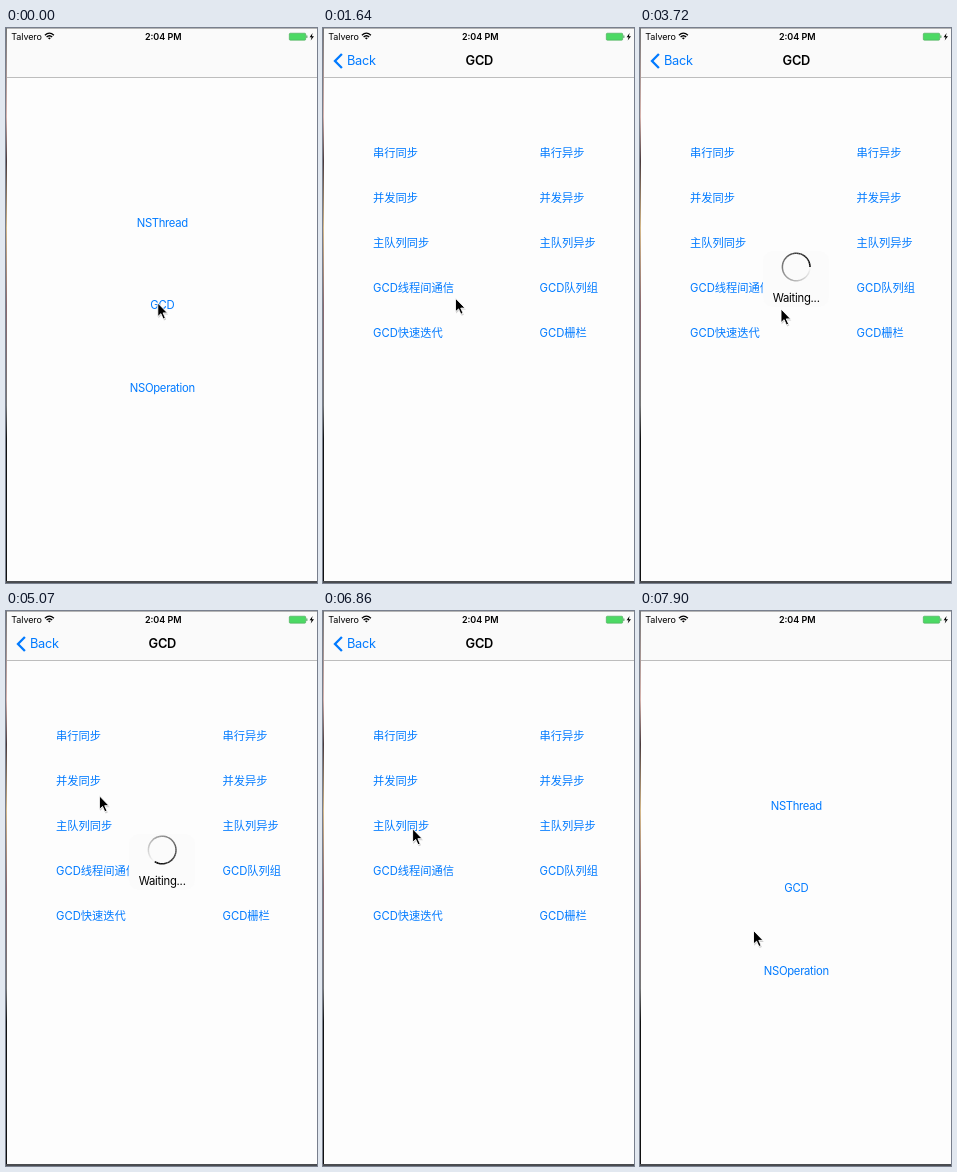
These frames come from a looping animation (311 px wide and 555 px high, 8000 ms). An HTML page:

```html
<!DOCTYPE html>
<html lang="zh">
<head>
<meta charset="utf-8">
<title>GCD demo</title>
<style>
  html, body { margin: 0; width: 100%; height: 100%; overflow: hidden; background: #fdfdfd; }
  svg { display: block; width: 100vw; height: 100vh; }
  text { font-family: Inter, "Noto Sans CJK SC", "Noto Sans CJK", sans-serif; }
  .btn text { font-size: 11.27px; fill: #007aff; }
  .latin text { letter-spacing: -.3px; text-anchor: middle; }
</style>
</head>
<body>
<svg viewBox="0 0 311 555" preserveAspectRatio="none">
  <defs>
    <linearGradient id="desk" x1="0" y1="0" x2="0" y2="1">
      <stop offset="0" stop-color="#777"/>
      <stop offset=".16" stop-color="#d8b4ae"/>
      <stop offset=".24" stop-color="#4a3a3c"/>
      <stop offset=".36" stop-color="#d6b98a"/>
      <stop offset=".5" stop-color="#8a6a70"/>
      <stop offset=".68" stop-color="#777"/>
      <stop offset=".74" stop-color="#111"/>
      <stop offset="1" stop-color="#111"/>
    </linearGradient>
    <linearGradient id="shade">
      <stop offset="0" stop-color="#000" stop-opacity="0"/>
      <stop offset="1" stop-color="#000" stop-opacity=".22"/>
    </linearGradient>
    <linearGradient id="table" x1="0" y1="0" x2="1" y2="1">
      <stop offset="0" stop-color="#7a6c6c"/>
      <stop offset="1" stop-color="#4c4145"/>
    </linearGradient>
    <linearGradient id="deck" x1="0" y1="0" x2="1" y2="1">
      <stop offset="0" stop-color="#d9d6d3"/>
      <stop offset="1" stop-color="#bfbbb8"/>
    </linearGradient>
    <clipPath id="screen"><rect x="1" y="0" width="310" height="553"/></clipPath>
    <clipPath id="photoBox"><rect x="100" y="418" width="112.5" height="112.5"/></clipPath>
  </defs>

  <rect width="311" height="555" fill="url(#desk)"/>
  <rect y="553" width="311" height="2" fill="#4a4c50"/>

  <g clip-path="url(#screen)">
    <rect x="1" width="310" height="553" fill="#fdfdfd"/>
    <g id="home" class="btn latin">
      <text x="156.3" y="198.6">NSThread</text>
      <text id="gcd" x="156.3" y="281.3">GCD</text>
      <text x="156.3" y="363.6">NSOperation</text>
    </g>
    <rect id="dim" x="1" width="310" height="553"/>

    <g id="page">
      <rect x="-4" y="49" width="5" height="504" fill="url(#shade)"/>
      <rect x="1" width="311" height="553" fill="#fdfdfd"/>
      <g id="list" class="btn"></g>
      <g id="photo" class="btn">
        <text x="133.3" y="407.3">隐藏图片</text>
        <g clip-path="url(#photoBox)">
          <rect x="100" y="418" width="113" height="113" fill="url(#table)"/>
          <path d="M100 418H213V481L160 517Q152 522 146 517L100 467Z" fill="url(#deck)"/>
          <path d="M100 468L146 518Q152 523 160 518L213 482" fill="none" stroke="#efecea" stroke-width="1.2"/>
          <path d="M100 418H213V430L114 459L100 446Z" fill="#3a3235"/>
          <g id="keys" stroke="#b9b2b0" stroke-width=".8"></g>
          <path d="M157 455L205 440L213 448V462L178 482Z" fill="#d6d2cf" stroke="#b3aeab" stroke-width=".6"/>
        </g>
      </g>
    </g>

    <rect x="1" width="310" height="49" fill="#fafafa"/>
    <rect id="tint" x="1" y="0" height="49" fill="#000" opacity=".035"/>
    <rect x="1" y="49" width="310" height="1" fill="#bdbdbd"/>
    <rect x="1" width="310" height=".7" fill="#999"/>

    <g id="nav">
      <path id="chevron" d="M18.9 26L12 33L18.9 40" fill="none" stroke="#007aff" stroke-width="2.3"/>
      <text id="back" y="37.4" font-size="12.8" letter-spacing="-.3" fill="#007aff">Back</text>
      <text id="title" y="37.4" font-size="12.8" font-weight="600" letter-spacing="-.3" text-anchor="middle">GCD</text>
    </g>

    <text x="5.3" y="11.6" font-size="9" letter-spacing="-.1">Talvero</text>
    <g fill="none" stroke="#000" stroke-width="1.3">
      <path d="M38.9 7.2Q43.4 3 47.9 7.2M40.6 9Q43.4 6.4 46.2 9"/>
      <path d="M43.4 11.6L41.9 10Q43.4 8.8 44.9 10Z" fill="#000" stroke="none"/>
    </g>
    <text x="157.3" y="11.7" font-size="9" font-weight="600" text-anchor="middle">2:04 PM</text>
    <rect x="283.3" y="5.2" width="16.4" height="7" rx="1" fill="#4cd964" stroke="#4aa65a" stroke-width=".6"/>
    <rect x="300.3" y="7.3" width="1.1" height="2.8" rx=".5" fill="#4aa65a"/>
    <path d="M306.6 5L303.6 9.2H305.6L304.7 12.6L308 8.2H305.9Z"/>

    <g id="hud">
      <rect x="123" y="223" width="66" height="56" rx="10" fill="#fbfbfb"/>
      <g id="ring" fill="none" stroke="#000" stroke-width="1.5"></g>
      <text x="156.2" y="274" font-size="11.27" letter-spacing="-.24" text-anchor="middle">Waiting...</text>
    </g>
  </g>

  <g id="cursor">
    <path d="M.6 1.6V15.2L3.8 12.2L6.2 17.6L8.4 16.6L6 11.4H10.4Z" fill="#000" opacity=".18"/>
    <path d="M0 0V13.6L3.1 10.7L5.4 16L7.6 15L5.3 9.9H9.6Z" stroke="#fff" stroke-width=".9"/>
  </g>
</svg>
<script>
const LOOP = 8000, STEP = 149, W = 311;
const PUSH = 748, POP = 7256;
const $ = id => document.getElementById(id);
const set = (id, attrs) => {
  for (const name in attrs) $(id).setAttribute(name, attrs[name]);
};
const show = (id, on) => set(id, { display: on ? "inline" : "none" });

const rows = [
  ["串行同步", "串行异步"],
  ["并发同步", "并发异步"],
  ["主队列同步", "主队列异步"],
  ["GCD线程间通信", "GCD队列组"],
  ["GCD快速迭代", "GCD栅栏"]
];
$("list").innerHTML = rows.map((pair, r) => pair.map((label, c) =>
  `<text id="b${r}${c}" x="${c ? 216.5 : 50}" y="${128.8 + r * 45}">${label}</text>`
).join("")).join("");

// Ring made of short arcs that fade behind the head
const ARCS = 45, RADIUS = 13.8;
const polar = a => `${RADIUS * Math.cos(a)} ${RADIUS * Math.sin(a)}`;
let arcs = "";
for (let i = 0; i < ARCS; i++) {
  const a = -i / ARCS * 2 * Math.PI, b = a - 2 * Math.PI / ARCS;
  arcs += `<path d="M${polar(a)}A${RADIUS} ${RADIUS} 0 0 0 ${polar(b)}" opacity="${1 - i / ARCS}"/>`;
}
$("ring").innerHTML = arcs;

// Gaps between the keyboard keys
let keys = "";
for (let i = 0; i < 6; i++) {
  const y = 450 - i * 8;
  keys += `<path d="M${108 - i * 8} ${y}L213 ${y - 30 + i}"/>`;
}
for (let i = 0; i < 13; i++) {
  const x = 112 + i * 8.4, y = 458 - i * 2.5;
  keys += `<path d="M${x} ${y}L${x - 34} ${y - 40}"/>`;
}
$("keys").innerHTML = keys;

// time, x, y of the pointer tip
const route = [
  [0, 151.8, 275], [1190, 151.8, 275], [1930, 119.5, 267], [3130, 120, 267.5],
  [3719, 141, 281], [4320, 141, 282], [4470, 148, 262], [4769, 158, 90],
  [4918, 122, 79], [5067, 92, 190], [5365, 148, 367], [5514, 153, 400],
  [5960, 153, 405], [6560, 153, 405], [7146, 24, 24], [7295, 24, 22],
  [7445, 27, 30], [7594, 50, 90], [7743, 82, 196], [7891, 113.5, 319.5], [LOOP, 113.5, 319.5]
];
function pointer(t) {
  let i = 1;
  while (i < route.length - 1 && t > route[i][0]) i++;
  const [t0, x0, y0] = route[i - 1], [t1, x1, y1] = route[i];
  const k = (t - t0) / (t1 - t0);
  return `translate(${x0 + (x1 - x0) * k} ${y0 + (y1 - y0) * k})`;
}

// Critically damped spring, 1 falling to 0
const spring = ms => {
  const x = Math.max(0, ms) * .0168;
  return (1 + x) * Math.exp(-x);
};

function draw(time) {
  const k = time < 600 ? -1 : Math.floor((time - 590) / STEP);
  const t = k < 0 ? 0 : 590 + k * STEP;

  let p = t < POP ? spring(t - PUSH) : 1 - spring(t - POP);
  if (k < 2) p = 1;
  if (p < .001) p = 0;
  if (k >= 49) p = 1;
  const shift = W * p, open = p < 1;

  set("home", { transform: `translate(${-.3 * (W - shift)} 0)` });
  set("gcd", { opacity: k === 0 || k === 1 ? .25 : 1 });
  set("dim", { opacity: .1 * (1 - p) });
  set("page", { transform: `translate(${shift} 0)` });
  show("page", open);
  show("nav", open);
  show("tint", open && p > 0);
  set("tint", { width: Math.min(310, shift + 9), opacity: .035 * (1 - p) });

  const fade = Math.max(0, 1 - 2.8 * p);
  set("chevron", { opacity: Math.exp(-4.6 * Math.sqrt(p)) });
  set("back", { x: 24 + shift * .23, opacity: fade });
  set("title", { x: 156.3 + shift * .39, opacity: fade });

  set("b30", { opacity: k >= 11 && k <= 13 ? .3 : 1 });
  show("photo", k >= 33 && k < 39);

  const entering = k === 13, leaving = k === 33;
  const scale = entering ? 1.18 : leaving ? .9 : 1;
  show("hud", k >= 13 && k <= 33);
  set("hud", {
    opacity: entering ? .22 : leaving ? .3 : 1,
    transform: `translate(156.2 250) scale(${scale}) translate(-156.2 -250)`
  });
  set("ring", { transform: `translate(156.2 239) rotate(${(t - 3719) * .36})` });
  set("cursor", { transform: pointer(t) });
}

const start = performance.now();
function tick() {
  draw((performance.now() - start) % LOOP);
  requestAnimationFrame(tick);
}
tick();
</script>
</body>
</html>
```
